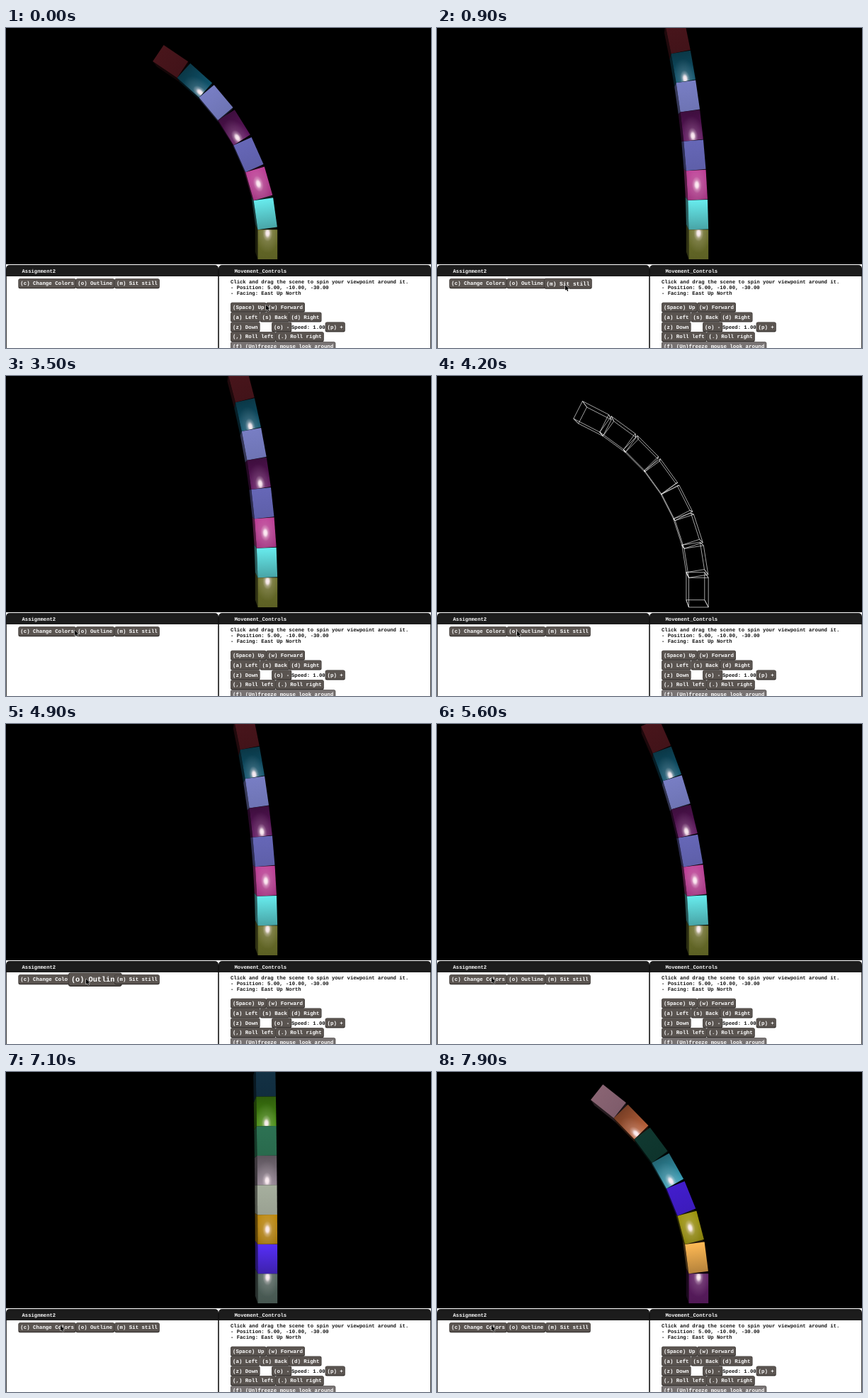
These frames come from a looping animation (600x451 px, 8 s). An HTML page with a canvas:

```html
<!DOCTYPE html>
<html lang="en">
<head>
<meta charset="utf-8">
<title>Swaying boxes</title>
<style>
html, body { margin: 0; width: 100%; height: 100%; overflow: hidden; background: #000; }
canvas { display: block; width: 600px; height: 451px; }
</style>
</head>
<body>
<canvas id="stage" width="600" height="451"></canvas>
<script>
const ctx = document.getElementById('stage').getContext('2d');
const LOOP = 8000, STEP = 100;
const MONO = '"Liberation Mono", "Courier New", monospace';

// Box colours from the bottom up; each click on the colour button picks the next set.
const palettes = [
  { from: 0, colors: ['#646827', '#58c8ca', '#b03a8c', '#6263b0', '#4e124e', '#7379bc', '#0d465a', '#45141a'] },
  { from: 5800, colors: ['#4c5e57', '#4a28d2', '#b07f0c', '#a0a898', '#756a75', '#2b6e50', '#3b750f', '#122f42'] },
  { from: 7250, colors: ['#571b5c', '#dc9e48', '#928a0c', '#3f1cc4', '#2d8194', '#0f362e', '#985030', '#84606f'] }
];
const OUTLINE = [3750, 4760];
const RESUME = 865;

const buttons = [
  { text: '(c) Change Colors', x: 20.3, y: 360, presses: [[5800, 6000], [7250, 7570]] },
  { text: '(o) Outline', x: 101.3, y: 360, presses: [[3750, 3900], [4760, 4920]] },
  { text: '(m) Sit still', x: 156, y: 360, presses: [[865, 1300]] },
  { text: '(Space) Up', x: 320, y: 393.5 },
  { text: '(w) Forward', x: 370, y: 393.5 },
  { text: '(a) Left', x: 320, y: 407.3 },
  { text: '(s) Back', x: 361.5, y: 407.3 },
  { text: '(d) Right', x: 402.5, y: 407.3 },
  { text: '(z) Down', x: 320, y: 421.2 },
  { text: '(o) -', x: 378, y: 421.2 },
  { text: '(p) +', x: 453.5, y: 421.2 },
  { text: '(,) Roll left', x: 320, y: 435 },
  { text: '(.) Roll right', x: 383.5, y: 435 },
  { text: '(f) (Un)freeze mouse look around', x: 320, y: 449, fill: '#787373' }
];

// time, x, y of the pointer tip
const pointer = [
  [0, 367, 390], [550, 367, 390], [820, 181, 362], [2350, 181, 362], [3200, 97, 358],
  [3500, 97, 358], [3700, 113, 359], [5050, 113, 359], [5600, 77, 357], [8000, 77, 357]
];

const clamp = v => Math.max(0, Math.min(1, v));

// The CSS "ease" curve
function ease(x) {
  x = clamp(x);
  let lo = 0, hi = 1;
  const bez = (p, q, s) => 3 * p * s * (1 - s) ** 2 + 3 * q * s * s * (1 - s) + s ** 3;
  for (let i = 0; i < 16; i++) {
    const mid = (lo + hi) / 2;
    if (bez(.25, .25, mid) < x) lo = mid; else hi = mid;
  }
  return bez(.1, 1, lo);
}

function shade(hex, k) {
  const n = parseInt(hex.slice(1), 16);
  return `rgb(${[n >> 16, n >> 8 & 255, n & 255].map(c => Math.min(255, Math.round(c * k)))})`;
}

function path(points) {
  ctx.beginPath();
  points.forEach(([x, y]) => ctx.lineTo(x, y));
  ctx.closePath();
}

const FRONT = 29, BACK = 31, W = 2, H = 3, MID_Y = 166.5;
const focal = MID_Y / Math.tan(Math.PI / 8);

function project([x, y], z) {
  const s = focal / z;
  return [300 + x * s, MID_Y - y * s];
}

function jointAngle(t) {
  if (t < RESUME) return 8;
  return 4.5 + 4.5 * Math.sin(Math.PI * (t / 1000 + 57.5 / 180));
}

function buildBoxes(deg) {
  const boxes = [];
  let x = 4, y = -11.5;
  for (let k = 0; k < 8; k++) {
    const a = k * deg * Math.PI / 180, c = Math.cos(a), s = Math.sin(a);
    const at = (u, v) => [x + u * c - v * s, y + u * s + v * c];
    const corners = [at(0, 0), at(W, 0), at(W, H), at(0, H)];
    const mid = at(W / 2, H / 2);
    boxes.push({ k, c, s, corners, dist: Math.hypot(...mid) });
    [x, y] = corners[3];
  }
  return boxes.sort((a, b) => b.dist - a.dist);
}

// How much lighter the top of a face is than its middle
function topLight(k) {
  if (k % 2) return k === 1 ? .18 : .04;
  return k > 2 ? -.22 : .08;
}

function drawFront(box, color) {
  const { k, c, s, corners } = box;
  const scale = focal / FRONT, [px, py] = project(corners[0], FRONT);
  ctx.save();
  ctx.transform(scale * c, -scale * s, -scale * s, -scale * c, px, py);
  ctx.beginPath();
  ctx.rect(0, 0, W, H);
  const g = ctx.createLinearGradient(0, 0, 0, H);
  g.addColorStop(0, shade(color, 1 - topLight(k)));
  g.addColorStop(1, shade(color, 1 + topLight(k)));
  ctx.fillStyle = g;
  ctx.fill();
  if (k % 2 === 0) {
    ctx.clip();
    ctx.translate(1 - .95 * s * s, [2.65, 1.5, .45, .28][k / 2]);
    ctx.scale(1, 1.7);
    const glow = ctx.createRadialGradient(0, 0, 0, 0, 0, 1.2);
    [[0, 1], [.13, .9], [.25, .42], [.42, .14], [1, 0]].forEach(([p, a]) =>
      glow.addColorStop(p, `rgba(255,240,245,${a})`));
    ctx.fillStyle = glow;
    ctx.fillRect(-3, -3, 6, 6);
  }
  ctx.restore();
}

function drawSolid(box, color, deg) {
  const p = box.corners;
  const sides = [.2, .15, .15, .52 - .03 * deg];
  sides.forEach((k, i) => {
    const a = p[i], b = p[(i + 1) % 4];
    const facing = (b[1] - a[1]) * a[0] - (b[0] - a[0]) * a[1];
    if (facing >= 0) return;
    path([project(a, FRONT), project(b, FRONT), project(b, BACK), project(a, BACK)]);
    ctx.fillStyle = shade(color, k);
    ctx.fill();
  });
  drawFront(box, color);
}

function drawWire(box) {
  ctx.strokeStyle = '#e8e8e8';
  ctx.lineWidth = .7;
  for (const z of [FRONT, BACK]) {
    path(box.corners.map(p => project(p, z)));
    ctx.stroke();
  }
  for (const p of box.corners) {
    path([project(p, FRONT), project(p, BACK)]);
    ctx.stroke();
  }
}

function drawScene(t) {
  ctx.fillStyle = '#000';
  ctx.fillRect(0, 0, 600, 451);
  const deg = jointAngle(t);
  const { colors } = palettes.filter(p => t >= p.from).pop();
  const wire = t >= OUTLINE[0] && t < OUTLINE[1];
  for (const box of buildBoxes(deg)) {
    if (wire) drawWire(box); else drawSolid(box, colors[box.k], deg);
  }
}

function write(text, x, y, size, color) {
  ctx.font = `bold ${size}px ${MONO}`;
  ctx.fillStyle = color;
  ctx.fillText(text, x, y);
}

function drawPanel(x, w, title) {
  ctx.fillStyle = '#fff';
  ctx.fillRect(x, 333, w, 118);
  ctx.fillStyle = '#1c1c1c';
  ctx.beginPath();
  ctx.roundRect(x, 334, w, 16, [5, 5, 0, 0]);
  ctx.fill();
  write(title, x + 22.5, 344.8, 7.22, '#fff');
  ctx.fillStyle = '#111';
  ctx.fillRect(x, 340, .8, 111);
  ctx.fillRect(x + w - .8, 340, .8, 111);
}

function pressScale(presses = [], t) {
  let v = 0;
  for (const [down, up] of presses) {
    if (t < down) continue;
    const grown = ease((Math.min(t, up) - down) / 300);
    v = t < up ? grown : grown * (1 - ease((t - up) / 300));
  }
  return 1 + v / 2;
}

function drawButton({ text, x, y, presses, fill = '#5a5450' }, t) {
  const size = 7.41, w = text.length * size * .6 + 5;
  const scale = pressScale(presses, t);
  ctx.save();
  ctx.translate(x - 2.5 + w / 2, y);
  ctx.scale(scale, scale);
  ctx.beginPath();
  ctx.roundRect(-w / 2 - .4, -6.8, w + .9, 14, 2.5);
  ctx.fillStyle = '#34302e';
  ctx.fill();
  ctx.beginPath();
  ctx.roundRect(-w / 2, -6.4, w, 12.5, 2.5);
  ctx.fillStyle = fill;
  ctx.fill();
  write(text, 2.5 - w / 2, 2.4, size, '#fff');
  ctx.restore();
}

function drawPointer(t) {
  const i = pointer.findIndex(p => p[0] > t);
  const [t0, x0, y0] = pointer[i - 1], [t1, x1, y1] = pointer[i];
  const f = clamp((t - t0) / (t1 - t0)), e = f * f * (3 - 2 * f);
  const x = x0 + (x1 - x0) * e, y = y0 + (y1 - y0) * e;
  const shape = [[0, 0], [0, 7.8], [1.8, 6.2], [3, 9], [4.3, 8.4], [3.1, 5.7], [5.5, 5.6]];
  path(shape.map(([a, b]) => [x + a, y + b]));
  ctx.fillStyle = '#000';
  ctx.strokeStyle = '#fff';
  ctx.lineWidth = 1;
  ctx.stroke();
  ctx.fill();
}

function draw(t) {
  ctx.textRendering = 'geometricPrecision';
  drawScene(t);
  drawPanel(0, 300, 'Assignment2');
  drawPanel(300, 300, 'Movement_Controls');
  ['Click and drag the scene to spin your viewpoint around it.',
    '- Position: 5.00, -10.00, -30.00',
    '- Facing: East Up North'].forEach((line, i) => write(line, 317, 359.6 + i * 8.35, 7.22, '#111'));
  buttons.forEach(b => drawButton(b, t));
  write('Speed: 1.00', 403, 423.5, 7.22, '#111');
  drawPointer(t);
}

const start = performance.now();
function frame() {
  const t = (performance.now() - start) % LOOP;
  draw(Math.floor(t / STEP) * STEP);
  requestAnimationFrame(frame);
}
frame();
</script>
</body>
</html>
```
